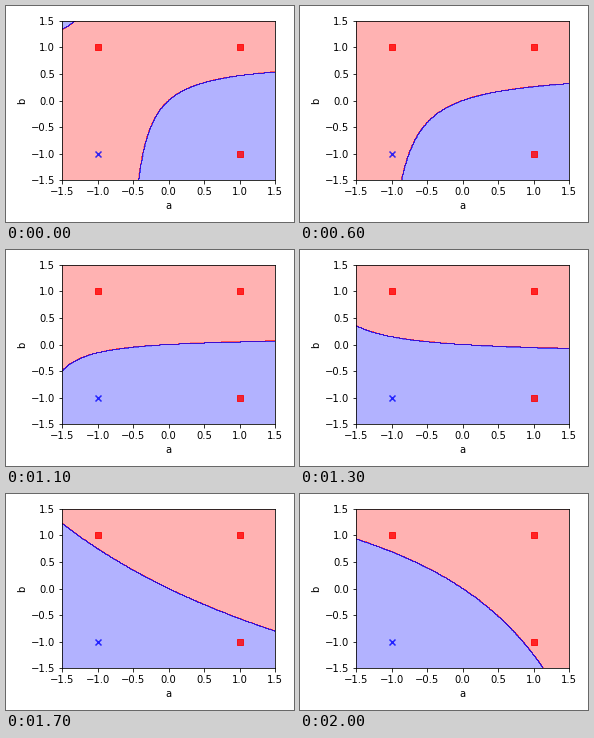
Animation, 288 px wide and 216 px high, one loop 2100 ms. Source, as a matplotlib script:

```python
import numpy as np
import matplotlib.pyplot as plt
from matplotlib.animation import FuncAnimation
from matplotlib.colors import ListedColormap

FRAMES, INTERVAL = 21, 100
RATE = 0.1
LIM = 1.5

points = np.array([(-1, -1), (-1, 1), (1, -1), (1, 1)])
labels = np.array([-1, 1, 1, 1])


def features(a, b):
    return np.stack([a, b, a * b], axis=-1)


def train(w, epochs):
    """Perceptron weights at the start and after every epoch."""
    x = features(*points.T)
    history = [w]
    for _ in range(epochs):
        wrong = np.sign(x @ w) != labels
        w = w + RATE * (labels[wrong, None] * x[wrong]).sum(axis=0)
        history.append(w)
    return history


weights = train(np.array([-2.003, 1.67, 2.607]), FRAMES - 1)

grid = np.linspace(-LIM, LIM, 301)
A, B = np.meshgrid(grid, grid)
mesh = features(A, B)
cmap = ListedColormap(["red", "blue"])

fig, ax = plt.subplots(figsize=(4, 3), dpi=72)
for label, marker, color in ((1, "s", "red"), (-1, "x", "blue")):
    ax.scatter(*points[labels == label].T, marker=marker, color=color,
               alpha=0.8, zorder=2)
ticks = np.arange(-LIM, LIM + 0.1, 0.5)
ax.set(xlim=(-LIM, LIM), ylim=(-LIM, LIM), xticks=ticks, yticks=ticks,
       xlabel="a", ylabel="b")
fig.tight_layout()

regions = []


def update(i):
    while regions:
        regions.pop().remove()
    side = np.where(mesh @ weights[i] > 0, -1, 1)
    regions.append(ax.contourf(A, B, side, alpha=0.3, cmap=cmap, zorder=1))
    return regions


anim = FuncAnimation(fig, update, frames=FRAMES, interval=INTERVAL,
                     init_func=lambda: [], repeat=True, repeat_delay=0)
plt.show()
```
